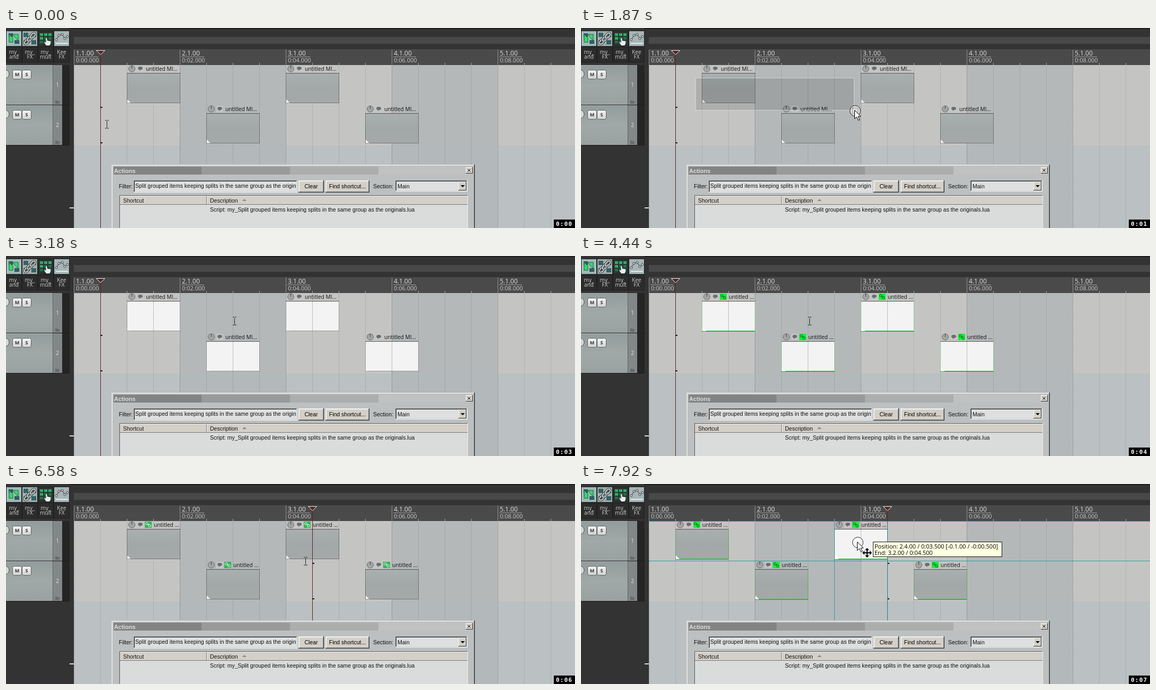
An HTML page with a canvas for the animation above (8 s loop, 1074 by 378 pixels).

```html
<!DOCTYPE html>
<html lang="en">
<head>
<meta charset="utf-8">
<title>Grouped items</title>
<style>
html, body { margin: 0; width: 100%; height: 100%; overflow: hidden; background: #333; }
canvas { display: block; }
</style>
</head>
<body>
<canvas id="stage" width="1074" height="378"></canvas>
<script>
const g = document.getElementById('stage').getContext('2d');
const LOOP = 8000, LEFT = 128, BEAT = 50, RIGHT = 1074;
const UI = '"Liberation Sans", sans-serif', SANS = '"Open Sans", sans-serif';
const FACE = '#d4d0c8', TEAL = '#2a9c9c';

// Screen updates come in bursts: [first, last, count]
const bursts = [[150, 1060, 8], [1210, 2240, 9], [2390, 3180, 7], [3770, 4040, 3],
  [4440, 4590, 2], [4990, 5390, 4], [5790, 6700, 8], [6850, 7370, 5], [7650, 7920, 3]];
const ticks = bursts.flatMap(([a, b, n]) =>
  Array.from({ length: n }, (_, i) => a + (b - a) * i / (n - 1)));

// Pointer path: [time, x, y]
const path = [[0, 190, 182], [150, 194, 180], [1060, 287, 107], [1210, 286, 105],
  [1460, 217, 95], [2240, 811, 215], [2390, 800, 210], [3180, 431, 123], [4860, 431, 123],
  [5390, 557, 115], [5660, 557, 115], [6170, 565, 146], [6570, 565, 146],
  [6840, 572, 110], [7370, 648, 110], [7920, 522, 110]];
const items = [[228, 0], [378, 1], [528, 0], [678, 1]];
const LASSO = 1460, SELECT = 2390, GROUP = 4440, DESELECT = 6170, DRAG = 6845, GRAB = 572;

function pointerAt(t) {
  const i = path.findIndex(p => p[0] >= t);
  if (i < 0) return path[path.length - 1].slice(1);
  if (i === 0) return path[0].slice(1);
  const [a, b] = [path[i - 1], path[i]], k = (t - a[0]) / (b[0] - a[0]);
  return [1, 2].map(n => Math.round(a[n] + (b[n] - a[n]) * k));
}

function rect(x, y, w, h, fill) { g.fillStyle = fill; g.fillRect(x, y, w, h); }
function frame(x, y, w, h, color) {
  g.strokeStyle = color; g.lineWidth = 1; g.strokeRect(x + .5, y + .5, w - 1, h - 1);
}
function bevel(x, y, w, h, light, dark) {
  rect(x, y, w, 1, light); rect(x, y, 1, h, light);
  rect(x, y + h - 1, w, 1, dark); rect(x + w - 1, y, 1, h, dark);
}
function text(s, x, y, font, color = '#111', align = 'left') {
  g.font = font; g.fillStyle = color; g.textAlign = align; g.fillText(s, x, y);
}
function poly(points, fill, stroke, close = true) {
  g.beginPath();
  points.forEach(([x, y]) => g.lineTo(x, y));
  if (close) g.closePath();
  if (fill) { g.fillStyle = fill; g.fill(); }
  if (stroke) { g.strokeStyle = stroke; g.lineWidth = 1; g.stroke(); }
}
function circle(x, y, r, fill, stroke) {
  g.beginPath(); g.arc(x, y, r, 0, 7);
  if (fill) { g.fillStyle = fill; g.fill(); }
  if (stroke) { g.strokeStyle = stroke; g.lineWidth = 1; g.stroke(); }
}
function dotted(x, y, h, color) {
  g.fillStyle = color;
  for (let i = 0; i < h; i += 2) g.fillRect(x, y + i, 1, 1);
}
function shade(y, h, ...colors) {
  const s = g.createLinearGradient(0, y, 0, y + h);
  colors.forEach((c, i) => s.addColorStop(i / (colors.length - 1), c));
  return s;
}

function toolbar() {
  ['#a2b9b9', '#a4adad', '#2b3333', '#a8b5b6'].forEach((c, i) => {
    rect(i * 30, 5, 30, 30, '#1d2020');
    rect(i * 30 + 1, 6, 28, 28, c);
    rect(i * 30, 36, 30, 29, '#202020');
    rect(i * 30 + 1, 37, 28, 27, '#2c2c2c');
  });
  rect(5, 10, 8, 7, '#2f5f5c'); rect(16, 23, 9, 7, '#2f5f5c');
  poly([[6, 12], [6, 27], [13, 27], [13, 19]], '#37d76f', '#17643a');
  poly([[12, 12], [23, 12], [23, 24]], '#37d76f', '#17643a');
  [[33, 9], [48, 9], [33, 23], [48, 23]].forEach(([x, y]) => rect(x, y, 9, 8, '#336463'));
  g.save(); g.translate(45, 20); g.rotate(-.8);
  for (let i = -1; i < 2; i++) {
    g.beginPath(); g.ellipse(i * 8, 0, 6, 3, 0, 0, 7);
    g.strokeStyle = '#303838'; g.lineWidth = 4; g.stroke();
    g.strokeStyle = '#d8dddd'; g.lineWidth = 2; g.stroke();
  }
  g.restore();
  for (let i = 0; i < 9; i++)
    rect(64 + i % 3 * 8, 10 + (i / 3 | 0) * 7, 6, 5, i < 4 ? '#2eaf61' : '#286b4b');
  poly([[75, 20], [77, 19], [78, 24], [84, 25], [84, 30], [82, 33], [76, 33], [72, 27], [76, 27]], '#eee');
  const nodes = [[95, 22], [100, 14], [106, 12], [111, 20], [116, 16]];
  poly(nodes, null, '#333b3b', false);
  nodes.forEach(([x, y]) => circle(x, y, 2, '#e4eaea', '#333b3b'));
  rect(94, 28, 23, 2, '#e4eaea');
  [['my_', 'and'], ['my_', 'FX'], ['my_', 'mult'], ['Kee', 'FX']].forEach((lines, i) =>
    lines.forEach((s, j) => text(s, i * 30 + 15, 49 + j * 9, '10px ' + SANS, '#d0d0d0', 'center')));
}

function tracks() {
  for (let i = 0; i < 2; i++) {
    const y = 70 + i * 76;
    rect(0, y, 89, 75, shade(y, 75, '#929c9c', '#a0a9a7', '#9aa2a1'));
    rect(0, y, 89, 1, '#b0b7b6');
    rect(89, y, 17, 75, '#828888');
    rect(88, y, 1, 75, '#5e6565');
    rect(106, y, 14, 75, '#252525');
    rect(0, y + 75, 120, 1, '#1c1c1c');
    circle(-2, y + 17, 8, '#d5d7d6', '#4a5050');
    ['M', 'S'].forEach((s, j) => {
      const x = 12 + j * 18;
      g.beginPath(); g.roundRect(x + .5, y + 9.5, 17, 17, 3);
      g.fillStyle = shade(y + 9, 18, '#f5f5f5', '#cfd1d0'); g.fill();
      g.strokeStyle = '#5b6161'; g.lineWidth = 1; g.stroke();
      text(s, x + 9, y + 21, 'bold 9px ' + SANS, '#333', 'center');
    });
    text(i + 1, 97, y + 41, '10px ' + SANS, '#e0e0e0', 'center');
    rect(93, y + 67, 4, 2, '#666c6c'); rect(93, y + 68, 8, 5, '#666c6c');
  }
  rect(120, 339, 8, 2, '#ddd');
}

function arrange() {
  rect(120, 0, 954, 2, '#1e1e1e');
  rect(LEFT, 17, 946, 13, '#484848');
  rect(LEFT, 40, 946, 30, '#4a4a4a');
  for (let bar = 0; bar < 5; bar++) {
    const x = LEFT + bar * 200, odd = bar % 2;
    rect(x, 70, 200, 152, odd ? '#b4b8b9' : '#c4c5c3');
    rect(x, 222, 200, 156, odd ? '#b3b9bb' : '#bbc0c2');
  }
  for (let x = LEFT, i = 0; x < RIGHT; x += BEAT, i++) {
    const bar = i % 4 === 0;
    rect(x, bar ? 41 : 66, 1, bar ? 29 : 4, bar ? '#929292' : '#aaa');
    if (bar) dotted(x, 70, 308, 'rgba(0,0,0,.34)');
    else rect(x, 70, 1, 308, 'rgba(0,0,0,.09)');
    if (!bar) continue;
    const n = i / 4;
    text(n + 1 + '.1.00', x + 4, 52, '12px ' + SANS, '#ddd');
    rect(x + 3, 54, 43, 1, '#a0a0a0');
    text(`0:0${n * 2}.000`, x + 4, 65, '11px ' + SANS, '#ccc');
  }
}

function item(x, lane, selected, grouped, groupLit) {
  const y = 70 + lane * 76, lit = grouped && groupLit;
  circle(x + 9.5, y + 7, 6, '#a3a5a5', '#6b6d6d');
  rect(x + 9, y + 1, 1, 6, '#444');
  rect(x + 19, y + 1, 13, 12, '#c4c6c6');
  g.beginPath(); g.ellipse(x + 25.5, y + 6, 4.5, 3, 0, 0, 7); g.fillStyle = '#6c6e6e'; g.fill();
  poly([[x + 23, y + 8], [x + 27, y + 8], [x + 24, y + 11]], '#6c6e6e');
  if (grouped) {
    rect(x + 34, y + 1, 13, 12, lit ? '#10f032' : '#34b556');
    const ink = lit ? '#106020' : '#e8f5e8';
    circle(x + 38, y + 5, 2.3, null, ink);
    circle(x + 43, y + 9, 2.3, null, ink);
    rect(x + 39, y + 6, 4, 1, ink);
  }
  text(grouped ? 'untitled ...' : 'untitled MI...', x + (grouped ? 51 : 36), y + 11, '10.2px ' + SANS);

  rect(x, y + 15, 101, 57, selected ? '#f3f3f3' : shade(y + 15, 57, '#aaafaf', '#a2a7a7', '#a5a9a9'));
  rect(x, y + 15, 101, 1, '#555');
  const edge = lit ? '#2a9a34' : '#3c3e3e';
  dotted(x, y + 15, 57, edge);
  dotted(x + 100, y + 15, 57, edge);
  poly([[x + 1, y + 65], [x + 8, y + 72], [x + 1, y + 72]], '#fff');
  if (lit) {
    rect(x + 8, y + 71, 93, 1, '#35c440');
    rect(x, y + 72, 101, 1, '#18b823');
  } else {
    for (let i = 0; i < 101; i += 2) rect(x + i, y + 71, 1, 1, edge);
  }
  if (selected) {
    const mid = Math.ceil((x + 1 - LEFT) / BEAT) * BEAT + LEFT;
    dotted(mid, y + 16, 56, '#888');
  }
}

function editCursor(x) {
  rect(x, 50, 1, 328, '#651a1d');
  poly([[x - 7.5, 42.5], [x + 8.5, 42.5], [x + .5, 50.5]], '#5a2325', '#eee');
  rect(x, 149, 4, 2, '#111'); rect(x, 216, 4, 2, '#111');
}

function button(x, y, w, h, label) {
  rect(x, y, w, h, FACE);
  bevel(x, y, w, h, '#eee', '#333');
  bevel(x + 1, y + 1, w - 2, h - 2, '#f6f6f4', '#8a8a88');
  text(label, x + w / 2, y + 15, '10.5px ' + UI, '#000', 'center');
}
function field(x, y, w, h) {
  rect(x, y, w, h, '#dde0df');
  bevel(x, y, w, h, '#777', '#f2f2f2');
  bevel(x + 1, y + 1, w - 2, h - 2, '#333', '#cfcfcd');
}

function dialog() {
  const font = '10.5px ' + UI;
  rect(199, 258, 686, 120, '#bdc0c1');
  bevel(199, 258, 686, 130, FACE, '#333');
  bevel(200, 259, 684, 130, '#f2f2f0', '#777');
  ['#828484', '#989a9a', '#acaeae', '#c0c2c1'].forEach((c, i) =>
    rect(203 + i * 167 - (i ? 1 : 0), 262, i < 3 ? 167 : 178, 15, c));
  text('Actions', 204, 274, 'bold 11px ' + UI, '#dcdcdc');
  rect(868, 263, 13, 12, FACE);
  bevel(868, 263, 13, 12, '#f5f5f5', '#333');
  poly([[871.5, 266.5], [876.5, 271.5]], null, '#000', false);
  poly([[876.5, 266.5], [871.5, 271.5]], null, '#000', false);

  text('Filter:', 213, 303, font);
  field(241, 288, 309, 23);
  text('Split grouped items keeping splits in the same group as the origin', 244, 302, font);
  button(552, 288, 48, 23, 'Clear');
  button(603, 288, 83, 23, 'Find shortcut...');
  text('Section:', 693, 303, font);
  field(735, 288, 136, 21);
  text('Main', 739, 303, font);
  rect(854, 290, 15, 17, FACE);
  bevel(854, 290, 15, 17, '#f5f5f5', '#333');
  poly([[858, 297], [866, 297], [862, 301]], '#000');

  rect(214, 316, 658, 62, '#d9dcda');
  bevel(214, 316, 658, 80, '#555', '#eee');
  rect(215, 317, 656, 16, FACE);
  rect(215, 317, 656, 1, '#f0f0ee');
  rect(215, 333, 656, 1, '#777');
  rect(378, 318, 1, 15, '#777'); rect(379, 318, 1, 15, '#f4f4f4');
  text('Shortcut', 221, 330, font);
  text('Description', 385, 330, font);
  poly([[446, 327], [454, 327], [450, 323]], '#8a8a88');
  text('Script: my_Split grouped items keeping splits in the same group as the originals.lua', 385, 347, font);
}

function arrow(x, y) {
  poly([[0, 0], [0, 16], [4, 12.5], [7, 19], [9.5, 18], [6.5, 11.5], [11.5, 11.5]]
    .map(([a, b]) => [x + a - .5, y + b - .5]), '#fff', '#000');
}
function ibeam(x, y) {
  rect(x, y - 6, 1, 13, '#222');
  [-8, 7].forEach(d => { rect(x - 3, y + d, 3, 1, '#222'); rect(x + 1, y + d, 3, 1, '#222'); });
}
function ring(x, y) { circle(x + .5, y + .5, 10, 'rgba(255,255,255,.45)', '#222'); }

function moveIcon(x, y) {
  rect(x - 6, y - 1, 13, 2, '#000'); rect(x - 1, y - 6, 2, 13, '#000');
  for (let i = 0; i < 4; i++) {
    g.save(); g.translate(x, y); g.rotate(i * Math.PI / 2);
    poly([[-4, -5], [4, -5], [0, -9]], '#000');
    g.restore();
  }
}

const barBeat = b => `${Math.floor(b / 4) + 1}.${b % 4 + 1}.00`;
const clock = b => `0:0${(b / 2).toFixed(3)}`;

function tooltip(x, y, shift) {
  const start = 8 + shift, sign = shift < 0 ? '-' : '+', n = Math.abs(shift);
  rect(x, y, 244, 29, '#ffffe1');
  frame(x, y, 244, 29, '#111');
  text(`Position: ${barBeat(start)} / ${clock(start)} [${sign}0.${n}.00 / ${sign}${clock(n)}]`,
    x + 3, y + 13, '11px ' + SANS, '#000');
  text(`End: ${barBeat(start + 2)} / ${clock(start + 2)}`, x + 3, y + 25, '11px ' + SANS, '#000');
}

function draw(time) {
  const t = ticks.reduce((last, s) => s <= time + .01 ? s : last, 0);
  const [x, y] = pointerAt(t);
  const lasso = t >= LASSO && t < SELECT, dragging = t >= DRAG;
  const shift = dragging ? Math.round((x - GRAB) / BEAT) : 0;
  const allSelected = t >= SELECT && t < DESELECT;

  rect(0, 0, RIGHT, 378, '#333');
  toolbar();
  tracks();
  arrange();
  items.forEach(([ix, lane], i) => item(ix + shift * BEAT, lane,
    allSelected || dragging && i === 2, t >= GROUP, allSelected || dragging));
  editCursor(t < DESELECT ? 178 : 578);

  if (dragging) {
    const left = 528 + shift * BEAT;
    [70, 145].forEach(line => rect(LEFT, line, 946, 1, TEAL));
    rect(left, 70, 1, 308, TEAL);
    rect(left + 100, 70, 1, 308, '#1d7f80');
  }
  if (lasso) {
    const w = x - 2 - 217, h = y - 1 - 95;
    if (w > 0 && h > 0) {
      rect(217, 95, w, h, 'rgba(0,0,0,.115)');
      frame(216, 94, w + 2, h + 2, 'rgba(225,228,228,.65)');
    }
  }
  dialog();

  if (lasso || dragging) ring(x, y);
  if (lasso) {
    g.setLineDash([1, 2]); frame(x - 5, y - 5, 11, 11, '#333'); g.setLineDash([]);
  }
  const overItem = items.some(([ix, lane]) =>
    x >= ix && x <= ix + 100 && y >= 85 + lane * 76 && y <= 142 + lane * 76);
  if (lasso || dragging || overItem) arrow(x, y);
  else ibeam(x, y);
  if (dragging) {
    moveIcon(x + 18, y + 20);
    tooltip(x + 29, y - 1, shift);
  }

  rect(1034, 362, 40, 16, '#000');
  g.letterSpacing = '1.2px';
  text('0:0' + Math.floor(t / 1000), 1038, 374, 'bold 11px "DejaVu Sans Mono", monospace', '#fff');
  g.letterSpacing = '0px';
}

const begin = performance.now();
function tick() {
  draw((performance.now() - begin) % LOOP);
  requestAnimationFrame(tick);
}
tick();
</script>
</body>
</html>
```
